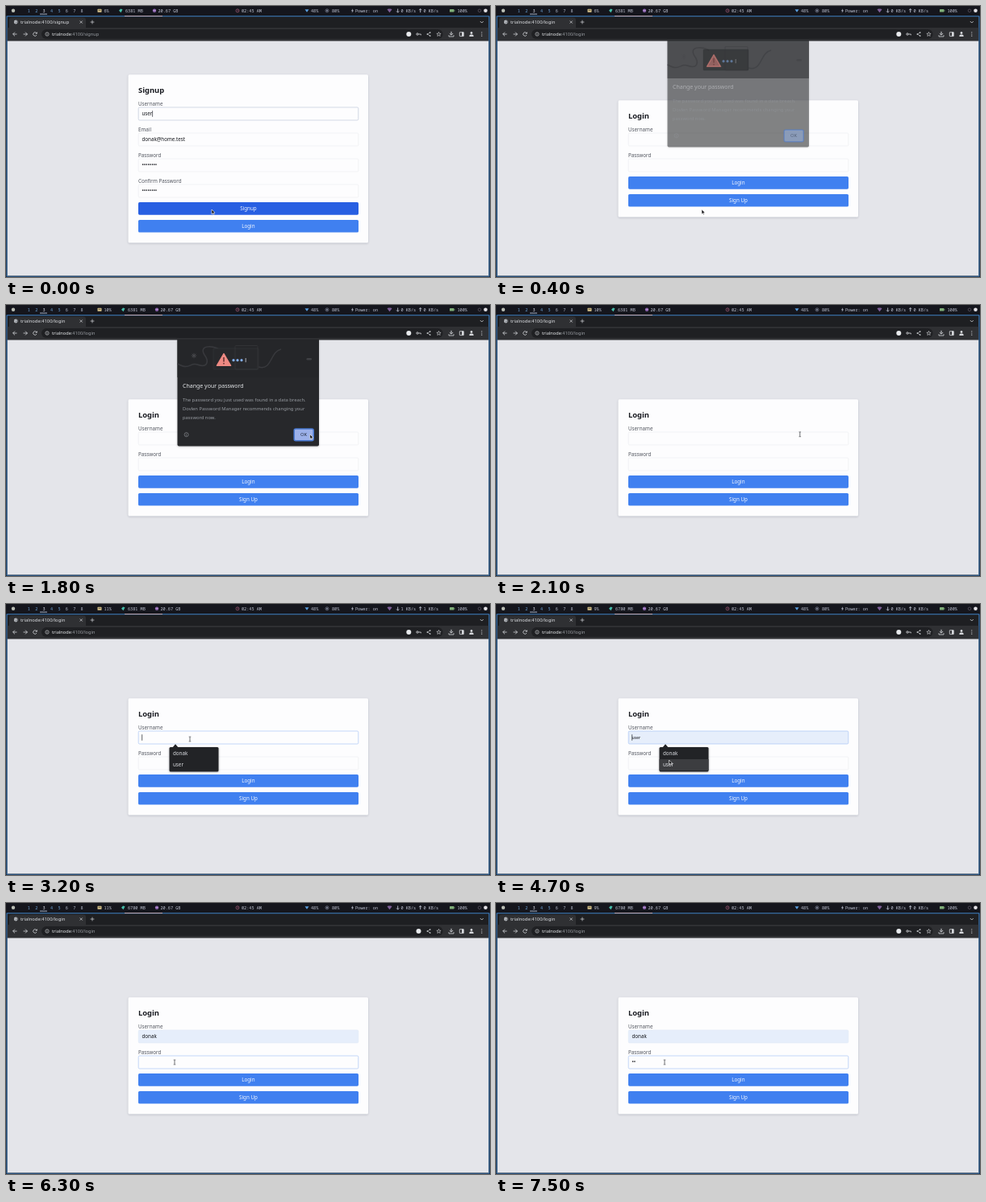
An HTML page with a canvas for the animation above (8 s loop, 600x337 px).

```html
<!DOCTYPE html>
<html lang="en">
<head>
<meta charset="utf-8">
<title>Sign up and log in</title>
<style>
html, body { margin: 0; width: 100%; height: 100%; overflow: hidden; background: #e4e5ea; }
canvas { display: block; width: 600px; height: 337px; }
</style>
</head>
<body>
<canvas id="stage"></canvas>
<script>
const W = 600, H = 337, LOOP = 8000, STEP = 100;
const SANS = '"Noto Sans", "Open Sans", sans-serif';
const MONO = '"Noto Sans Mono", "DejaVu Sans Mono", monospace';
const HOST = 'trialnode', PORT = ':4100/';
const MEMBER = 'donak', MAIL = 'donak@home.test';
const LEFT = 164, RIGHT = 437, TEXT_X = 168.4;

const canvas = document.getElementById('stage');
const ratio = window.devicePixelRatio || 1;
canvas.width = W * ratio;
canvas.height = H * ratio;
const c = canvas.getContext('2d');

// Moments of the story, in ms
const LOGIN = 300, DIALOG_IN = 400, DIALOG_OUT = 1900, FOCUS = 3000,
      PICK = 5500, PASSWORD = 6000, TYPE = [6800, 7000];

const PATH = [
  [0, 255, 253], [1000, 255, 253], [1300, 312, 282], [1800, 376.8, 160.8],
  [2400, 376.8, 160.8], [2700, 300, 216], [3000, 228, 168], [3500, 228, 168],
  [3900, 222, 199], [4400, 220, 229], [4700, 214.5, 194], [5000, 214, 184],
  [5500, 214, 184], [5800, 209, 198], [LOOP, 209, 198]
];

const LOAD = [[0, '6%'], [1400, '10%'], [2700, '11%'], [4400, '9%'], [5400, '11%'], [6700, '9%']];
const MEMORY = [[0, '6381 MB'], [3900, '6780 MB']];
const NET = [[0, 0], [2700, 1], [3900, 0]];

const at = (list, t) => list.filter(e => e[0] <= t).pop()[1];
const within = (m, x, y, w, h) => m.x >= x && m.x < x + w && m.y >= y && m.y < y + h;

function mouseAt(t) {
  const i = Math.max(1, PATH.findIndex(p => p[0] > t));
  const [t0, x0, y0] = PATH[i - 1], [t1, x1, y1] = PATH[i];
  const k = (t - t0) / (t1 - t0), e = k * k * (3 - 2 * k);
  return { x: x0 + (x1 - x0) * e, y: y0 + (y1 - y0) * e };
}

function rect(x, y, w, h, fill) {
  c.fillStyle = fill;
  c.fillRect(x, y, w, h);
}

function box(x, y, w, h, r, fill, stroke, line = 0.5) {
  c.beginPath();
  c.roundRect(x, y, w, h, r);
  if (fill) { c.fillStyle = fill; c.fill(); }
  if (stroke) { c.strokeStyle = stroke; c.lineWidth = line; c.stroke(); }
}

function text(s, x, y, size, fill, { weight = 400, family = SANS, align = 'left' } = {}) {
  c.font = `${weight} ${size}px ${family}`;
  c.textAlign = align;
  c.fillStyle = fill;
  c.fillText(s, x, y);
  return c.measureText(s).width;
}

function disc(x, y, r, fill) {
  c.beginPath();
  c.arc(x, y, r, 0, 7);
  c.fillStyle = fill;
  c.fill();
}

function ring(x, y, r, stroke, line = 0.6) {
  c.beginPath();
  c.arc(x, y, r, 0, 7);
  c.strokeStyle = stroke;
  c.lineWidth = line;
  c.stroke();
}

// Lines or a filled shape from a flat list of coordinates
function poly(points, stroke, line = 0.7, fill) {
  c.beginPath();
  for (let i = 0; i < points.length; i += 2) c.lineTo(points[i], points[i + 1]);
  if (fill) { c.closePath(); c.fillStyle = fill; c.fill(); }
  if (stroke) { c.strokeStyle = stroke; c.lineWidth = line; c.stroke(); }
}

function shadow(color, blur, dy) {
  c.shadowColor = color;
  c.shadowBlur = blur * ratio;
  c.shadowOffsetY = dy * ratio;
}

function statusBar(t) {
  rect(0, 0, W, 12, '#15161d');
  const mono = (s, x, fill = '#c3c7d6') => text(s, x, 7.7, 5.2, fill, { family: MONO, weight: 500 });
  disc(9, 5.8, 2.2, '#b9bdb4');
  for (let i = 0; i < 8; i++) {
    mono(i + 1, 26.8 + i * 9.4, i === 2 ? '#e3e6f0' : i < 5 ? '#6da3d8' : '#b3bacb');
  }
  rect(42, 9.6, 9, 0.9, '#b8c7e2');

  const load = at(LOAD, t), dx = load.length > 2 ? 3 : 0;
  box(113.5, 3.8, 5, 4, 0.6, '#d9c48b');
  rect(114.5, 4.8, 3, 1, '#5d563f');
  mono(load, 121.5);
  poly([140 + dx, 5.8, 142 + dx, 3.4, 144.5 + dx, 4.3, 142.5 + dx, 8.2], null, 0, '#45bca9');
  mono(at(MEMORY, t), 148 + dx);
  disc(184 + dx, 5.8, 2.2, '#8a63ad');
  rect(182.4 + dx, 5, 3.2, 0.7, '#c9a9df');
  mono('20.67 GB', 188.5 + dx);

  ring(287, 5.8, 2, '#b76583');
  poly([287, 4.6, 287, 5.8, 288, 5.8], '#b76583', 0.5);
  mono('02:45 AM', 292);
  poly([370.5, 4.3, 375.5, 4.3, 373, 7.8], null, 0, '#5a9fe0');
  mono('48%', 378);
  ring(398, 5.8, 2, '#8b92a6');
  disc(398, 5.8, 1, '#8b92a6');
  mono('80%', 404);
  poly([430, 3.3, 428, 6.3, 429.5, 6.3, 428.5, 8.8, 431, 5.4, 429.6, 5.4], null, 0, '#c3c7d6');
  mono('Power: on', 433);
  poly([472.5, 4.3, 474, 3.5, 477, 3.5, 478.5, 4.3, 475.5, 8.3], null, 0, '#7e5f98');
  const net = at(NET, t);
  for (const [x, d] of [[485, 1], [513, -1]]) {
    poly([x + 0.7, 5.8 - 2.3 * d, x + 0.7, 5.8 + 2 * d], '#c3c7d6', 0.9);
    poly([x - 0.9, 5.8 + 0.6 * d, x + 0.7, 5.8 + 2.4 * d, x + 2.3, 5.8 + 0.6 * d], '#c3c7d6', 0.8);
    mono(net + ' KB/s', x + 4.5);
  }
  box(550, 4, 5.4, 3.6, 0.6, '#7fae78');
  rect(555.6, 5, 0.7, 1.6, '#7fae78');
  mono('100%', 559.5);
  ring(587, 5.8, 1.8, '#6a6471');
  disc(594.5, 5.8, 2.3, '#e2e0e4');
}

// Wallpaper showing around the window, and the window's own edge
function desktop() {
  rect(0, 0, W, H, '#14263f');
  box(1.2, 12.9, 597.6, 323, 0.5, '#1f2023', '#3f7db9', 1.2);
  rect(147, 11.6, 47, 1.2, '#dcb9be');
}

function browser(t, page) {
  const light = '#d5d7db', dim = '#989ca2', bar = '#2f3033';
  rect(1.8, 13.5, 596.4, 322, '#1e1f22');
  box(4, 14.5, 95, 14, [3, 3, 0, 0], bar);
  rect(1.8, 27, 596.4, 16.5, bar);
  disc(12.2, 20, 2.4, '#c2c5ca');
  poly([10.5, 19, 12, 20.5, 11.5, 21.5], '#55585e', 0.7);
  poly([12.8, 18, 13.8, 19.5, 13.2, 21.6], '#55585e', 0.7);
  text(HOST + PORT + page, 18, 22.2, 5.8, '#dfe1e5');
  poly([91.6, 18.4, 94.8, 21.6], light, 0.7);
  poly([94.8, 18.4, 91.6, 21.6], light, 0.7);
  poly([104.6, 20, 109.4, 20], light, 0.7);
  poly([107, 17.6, 107, 22.4], light, 0.7);
  poly([587.8, 19, 589.8, 21, 591.8, 19], light, 0.8);

  for (const [x, d] of [[11, 1], [24, -1]]) {
    poly([x - 2.5 * d, 35, x + 2.5 * d, 35], light, 0.8);
    poly([x, 32.6, x - 2.4 * d, 35, x, 37.4], light, 0.8);
  }
  c.beginPath();
  c.arc(36, 35, 2.3, 0.5, 5.6);
  c.strokeStyle = light;
  c.lineWidth = 0.8;
  c.stroke();
  poly([38.7, 32.2, 38.7, 34.6, 36.3, 34.6], null, 0, light);

  box(44, 29, 497.5, 12, 6, '#1f2023');
  ring(51, 35, 2.2, light, 0.6);
  rect(50.7, 34.6, 0.6, 1.7, light);
  rect(50.7, 33.5, 0.6, 0.6, light);
  const w = text(HOST, 57, 37, 5.6, '#e6e8eb');
  text(PORT + page, 57 + w, 37, 5.6, dim);

  const keyHidden = t >= PASSWORD && t < 6700;
  disc(keyHidden ? 511.5 : 499.3, 35, 3, '#e8eaed');
  if (!keyHidden) {
    ring(510, 35, 1.2, light, 0.8);
    poly([511.2, 35, 514.3, 35, 514.3, 36.4], light, 0.8);
  }
  poly([525.6, 33, 522.4, 35, 525.6, 37], light, 0.6);
  for (const [x, y] of [[525.7, 33], [522.4, 35], [525.7, 37]]) disc(x, y, 0.85, light);

  const star = [];
  for (let i = 0; i < 11; i++) {
    const r = i % 2 ? 1.2 : 2.8, a = i * Math.PI / 5 - Math.PI / 2;
    star.push(536.5 + r * Math.cos(a), 35.2 + r * Math.sin(a));
  }
  poly(star, light, 0.6);
  poly([552, 31.8, 552, 35.8], light, 1);
  poly([549.8, 34, 552, 36.2, 554.2, 34], light, 0.9);
  poly([549, 36.2, 549, 38, 555, 38, 555, 36.2], light, 0.8);
  box(562.3, 32.6, 5, 5, 0.4, null, light, 0.8);
  rect(565, 32.6, 2.3, 5, light);
  disc(577, 33.5, 1.4, light);
  box(574.4, 35.5, 5.2, 2.4, [1.6, 1.6, 0, 0], light);
  for (const y of [32.8, 35, 37.2]) disc(589.8, y, 0.6, light);

  rect(1.8, 43.5, 596.4, 291.9, '#e4e5ea');
}

function card(top, height, title) {
  c.save();
  shadow('rgba(30,40,70,0.2)', 2.5, 0.8);
  box(151.5, top, 297.5, height, 1.6, '#fdfdfe');
  c.restore();
  text(title, LEFT, top + 22.2, 9.375, '#17191f', { weight: 700 });
}

function field(top, label, value, { border = '#e9ebef', fill = '#fdfdfe', caret, preview } = {}) {
  text(label, LEFT, top + 7.1, 6.25, '#52565f');
  box(LEFT + 0.2, top + 9.4, RIGHT - LEFT - 0.4, 16, 1.5, fill, border, 0.6);
  const w = text(value, TEXT_X, top + 19.6, preview ? 5.2 : 6.25, '#15171c');
  if (caret) rect(TEXT_X + (preview ? 0 : w), top + 13.6, 0.7, 7.6, '#25282e');
}

function button(top, label, mouse) {
  const over = mouse && within(mouse, LEFT, top, RIGHT - LEFT, 15.6);
  box(LEFT, top, RIGHT - LEFT, 15.6, 1.6, over ? '#285fe2' : '#4080f0');
  text(label, 300.4, top + 10.3, 6.25, '#f2f6fe', { align: 'center' });
}

function signupPage(t, mouse) {
  const top = 85.3, dots = '••••••••', row = i => top + 31.3 + i * 32;
  card(top, 209.3, 'Signup');
  field(row(0), 'Username', 'user', t < 100 ? { border: '#b6bfd3', caret: true } : {});
  field(row(1), 'Email', MAIL);
  field(row(2), 'Password', dots);
  field(row(3), 'Confirm Password', dots);
  button(row(4) - 0.5, 'Signup', mouse);
  button(row(4) + 21.4, 'Login', mouse);
}

function loginPage(t, mouse, option) {
  const top = 117.3, focus = '#9dbdf3';
  const user = t >= PICK ? MEMBER : option || '';
  const userFocus = t >= FOCUS && t < PASSWORD, passFocus = t >= PASSWORD;
  const typed = TYPE.filter(k => t >= k).length;
  const userCaret = userFocus && t < PICK && (option || (t - FOCUS) % 1000 < 500);
  const passCaret = passFocus && (t < 6300 || (t >= 6700 && t < 7500));

  card(top, 145.3, 'Login');
  field(top + 31.3, 'Username', user, {
    border: userFocus ? focus : user ? '#e0e9f7' : undefined,
    fill: user ? '#e6eefb' : undefined,
    caret: userCaret,
    preview: t < PICK && option
  });
  field(top + 63.3, 'Password', '•'.repeat(typed), {
    border: passFocus ? focus : undefined, caret: passCaret
  });
  button(top + 94.8, 'Login', mouse);
  button(top + 116.7, 'Sign Up', mouse);
}

function suggestions(option) {
  c.save();
  shadow('rgba(0,0,0,0.3)', 3, 0.8);
  box(202.5, 178, 61, 30.5, 1.5, '#222326');
  c.restore();
  poly([206.6, 178.2, 210, 174.2, 213.4, 178.2], null, 0, '#222326');
  [MEMBER, 'user'].forEach((name, i) => {
    if (name === option) rect(202.5, 179 + i * 14, 61, 14, '#3c3d40');
    text(name, 207, 188.2 + i * 14, 6.25, '#dcdee2');
  });
}

function dialog(alpha, over) {
  const x = 212.5, line = '#38393d', grey = '#979ba1';
  c.save();
  c.globalAlpha = alpha;
  c.save();
  shadow('rgba(0,0,0,0.25)', 2.5, 0.6);
  box(x, 43, 175.5, 132.6, [0, 0, 2, 2], '#27282b');
  c.restore();
  rect(x, 43, 175.5, 47, '#252629');

  c.strokeStyle = line;
  c.lineWidth = 1.5;
  c.beginPath();
  c.moveTo(x, 73);
  c.bezierCurveTo(228, 82, 228, 71, 237, 74);
  c.bezierCurveTo(250, 79, 252, 70, 246, 62);
  c.bezierCurveTo(239, 50, 254, 50, 264, 55);
  c.stroke();
  c.beginPath();
  c.moveTo(313, 77);
  c.bezierCurveTo(330, 82, 327, 58, 341, 55);
  c.stroke();
  for (let i = 0; i < 4; i++) {
    const a = i * Math.PI / 4, p = 3.2 * Math.cos(a), q = 3.2 * Math.sin(a);
    poly([233 - p, 63 - q, 233 + p, 63 + q], '#4a4b4f', 0.9);
  }
  box(257, 54, 56, 26, 1, '#27282b', '#333438', 0.7);
  box(284, 50.5, 28, 29.5, 1, null, '#37383c', 0.7);
  box(372.5, 66, 6.5, 2.4, 1.2, '#3f4044');

  c.lineJoin = 'round';
  poly([270, 60.5, 278.6, 75.3, 261.4, 75.3], '#ee8a83', 1.4, '#ee8a83');
  rect(269.3, 65, 1.4, 5.6, '#55272a');
  rect(269.3, 72, 1.4, 1.5, '#55272a');
  for (const dx of [282, 287, 292]) disc(dx, 68.7, 1.6, '#83aff0');
  rect(296.7, 66, 0.9, 5.2, '#b9bcc2');

  text('Change your password', 219, 102.9, 7, '#e4e6e9');
  ['The password you just used was found in a data breach.',
   'Dovlen Password Manager recommends changing your',
   'password now.'
  ].forEach((s, i) => text(s, 219, 120.2 + i * 10.7, 5.82, grey));

  ring(223.6, 161.2, 2.5, grey, 0.6);
  rect(223.3, 160.8, 0.6, 1.8, grey);
  rect(223.3, 159.6, 0.6, 0.6, grey);
  box(357.2, 154.1, 24, 14.6, 2, over ? '#9cb1ea' : '#96b5f0', '#4a7ad2', 1.5);
  text('OK', 369, 163.3, 5.8, '#20293b', { align: 'center', weight: 500 });
  c.restore();
}

function arrow({ x, y }) {
  poly([x, y, x, y + 5.8, x + 1.3, y + 4.6, x + 2.2, y + 6.5, x + 3.1, y + 6,
        x + 2.3, y + 4.2, x + 4, y + 4.1, x, y], '#e8e8ea', 0.7, '#0c0c0e');
}

function beam({ x, y }) {
  poly([x, y - 2.7, x, y + 2.7], '#33353a', 0.7);
  for (const e of [-2.9, 2.9]) poly([x - 1.3, y + e, x + 1.3, y + e], '#33353a', 0.6);
}

function draw(t) {
  c.setTransform(ratio, 0, 0, ratio, 0, 0);
  const mouse = mouseAt(t);
  const dialogAlpha = t < DIALOG_IN ? 0 : t < DIALOG_OUT
    ? Math.min(1, (t - DIALOG_IN + STEP) / 200)
    : Math.max(0, 1 - (t - DIALOG_OUT + STEP) / 300);
  const open = t >= FOCUS && t < PICK;
  const onList = open && within(mouse, 202.5, 178, 61, 30.5);
  const option = onList ? (mouse.y < 193 ? MEMBER : 'user') : null;
  const pageMouse = onList ? null : mouse;

  desktop();
  statusBar(t);
  if (t < LOGIN) {
    browser(t, 'signup');
    signupPage(t, pageMouse);
  } else {
    browser(t, 'login');
    loginPage(t, pageMouse, option);
  }
  if (open) suggestions(option);
  if (dialogAlpha > 0) dialog(dialogAlpha, within(mouse, 357, 154, 24, 14));

  const overField = !onList && !dialogAlpha && t >= LOGIN &&
    [158, 190].some(y => within(mouse, LEFT, y, RIGHT - LEFT, 16.4));
  (overField ? beam : arrow)(mouse);
}

const start = performance.now();
function tick() {
  const t = (performance.now() - start) % LOOP;
  draw(Math.floor(t / STEP) * STEP);
  requestAnimationFrame(tick);
}
tick();
</script>
</body>
</html>
```
